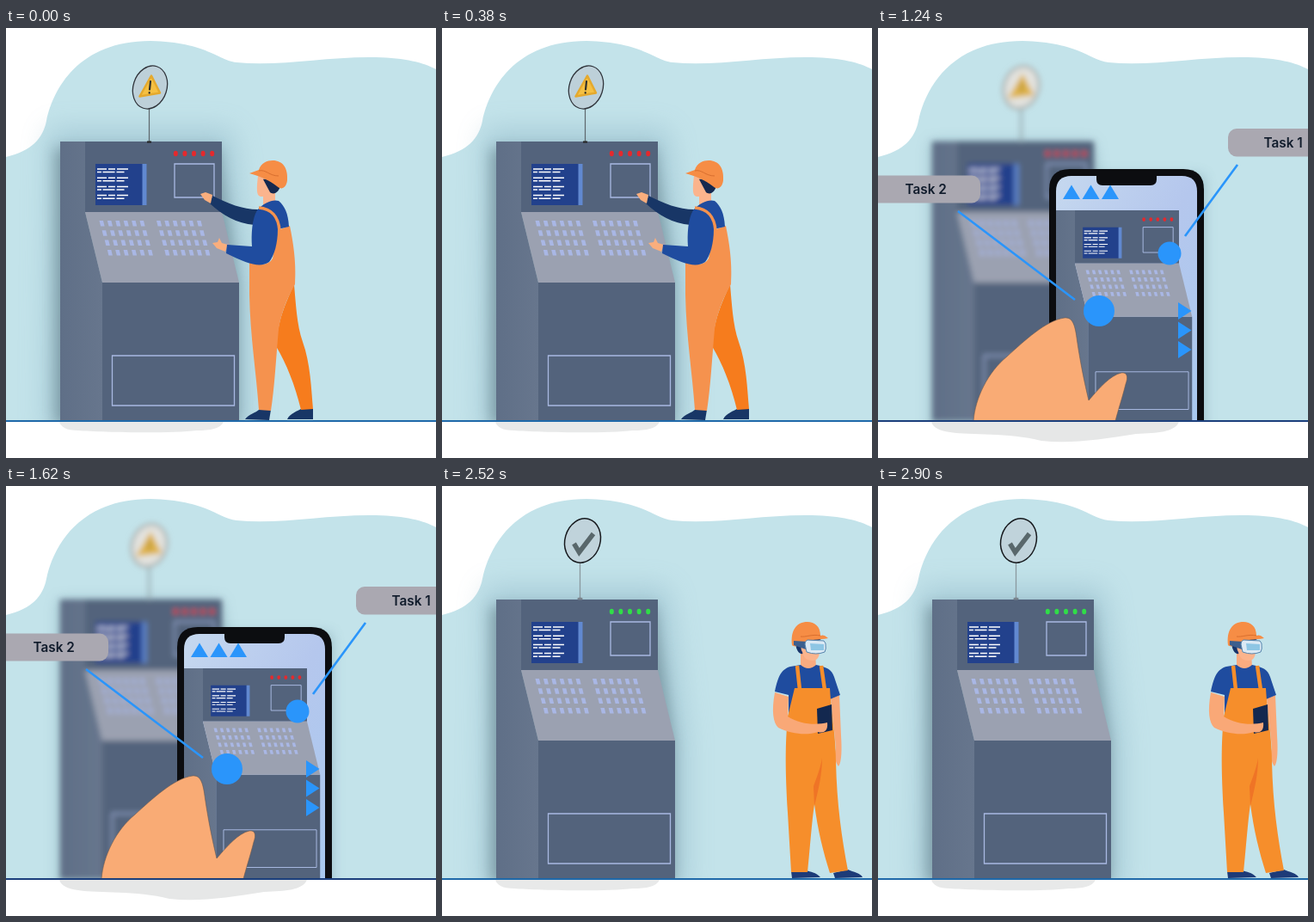
Write an HTML page that moves like this. It is 500 px wide and 500 px high and loops after 3.16 s.

```html
<!DOCTYPE html>
<html lang="en">
<head>
<meta charset="utf-8">
<title>Machine service</title>
<style>
html, body { margin: 0; width: 100%; height: 100%; overflow: hidden; background: #fff; }
svg { display: block; width: 100vw; height: 100vh; }
.scene { display: none; }
.scene.on { display: inline; }
text { font: 600 15.3px Inter, sans-serif; fill: #111c2c; }
</style>
</head>
<body>
<svg viewBox="0 0 500 500">
<defs>
  <filter id="glow" x="-30%" y="-20%" width="160%" height="140%"><feGaussianBlur stdDeviation="16"/></filter>
  <filter id="near" x="-30%" y="-20%" width="160%" height="140%"><feGaussianBlur stdDeviation="8"/></filter>
  <filter id="soft" x="-20%" y="-20%" width="140%" height="140%"><feGaussianBlur stdDeviation="3"/></filter>
  <clipPath id="air"><path d="M0 0H500V457H0Z"/></clipPath>
  <clipPath id="glass"><path d="M207 457V190Q207 172 225 172H353Q371 172 371 190V457Z"/></clipPath>
  <linearGradient id="sideFill" x2="1"><stop stop-color="#5f6f87"/><stop offset="1" stop-color="#67768d"/></linearGradient>
  <linearGradient id="glassFill" x2="1" y2="1"><stop stop-color="#c5d8ef"/><stop offset=".5" stop-color="#b5c7ed"/><stop offset="1" stop-color="#a9c9ef"/></linearGradient>
  <linearGradient id="beamFill" x1="1" x2="0"><stop stop-color="#9cf0f1" stop-opacity=".75"/><stop offset=".45" stop-color="#a9eef0" stop-opacity=".5"/><stop offset="1" stop-color="#b8eaf0" stop-opacity="0"/></linearGradient>
  <linearGradient id="fallFill" x2="0" y2="1"><stop stop-color="#95eef0" stop-opacity=".6"/><stop offset="1" stop-color="#a5e8ee" stop-opacity=".15"/></linearGradient>

  <g id="machine">
    <path fill="url(#sideFill)" d="M63 132H92V214L112 296V457H63Z"/>
    <path fill="#53637c" d="M92 132H251V214H92ZM112 296H271V457H112Z"/>
    <path fill="#9ba1b1" d="M92 214H251L271 296H112Z"/>
    <path fill="#22418c" d="M104 158H159V206H104Z"/>
    <path fill="#6189d0" d="M158.500 158H163.500V206H158.500Z"/>
    <g id="log" stroke="#fff" stroke-width="1.500"/>
    <g fill="none" stroke="#a9b9e2" stroke-width="1.300">
      <path d="M196 158H242V197H196Z"/><path d="M123.500 381H265.500V439H123.500Z"/>
    </g>
    <g id="keys" fill="#a9b7e5"/>
    <g id="lamps"/>
  </g>

  <g id="alarm">
    <path d="M166.500 94V133" stroke="#5d666c" stroke-width="1.200"/>
    <path d="M164 132.500H169" stroke="#222" stroke-width="2"/>
    <ellipse cx="167.500" cy="69" rx="19.500" ry="25.500" transform="rotate(18 167.500 69)" fill="#bdd0d9" stroke="#30343b" stroke-width="1.300"/>
    <path d="M169 55.500L179 75.500L155.500 79.500Z" fill="#f5c043" stroke="#e5a92d" stroke-width="2.500" stroke-linejoin="round"/>
    <path d="M168 62L167 71.500M166.700 75V75.600" stroke="#30302c" stroke-width="2.200" stroke-linecap="round"/>
  </g>

  <g id="done">
    <path d="M160.500 89V131" stroke="#8b999f" stroke-width="1.300"/>
    <ellipse cx="160.500" cy="131" rx="3" ry="1.500" fill="#7b858d"/>
    <ellipse cx="163.500" cy="63.500" rx="20.500" ry="26" transform="rotate(16 163.500 63.500)" fill="#c0d3db" stroke="#16191d" stroke-width="1.500"/>
    <path d="M153.500 67L159.500 77L176 55.500" fill="none" stroke="#59676b" stroke-width="5.500"/>
  </g>

  <g id="shade">
    <g clip-path="url(#air)">
      <path filter="url(#glow)" opacity=".34" fill="#6f9cb2" d="M50 118H262L284 296V470H46Z"/>
      <path filter="url(#near)" opacity=".45" fill="#4d6670" d="M56 140H248L270 300V462H56Z"/>
    </g>
    <path fill="#e8e9e9" d="M62 458H253C249 466 238 468 222 468C190 472 108 470 84 468C70 468 64 464 62 458Z"/>
  </g>

  <!-- standing worker without the free arm and the tablet -->
  <g id="body">
    <path fill="#1d3b78" d="M284 455C286 450 295 449 301 446L318 450L316 456ZM333 455C338 449 345 449 349 447L367 448L366 456Z"/>
    <path fill="#f9ab80" d="M339 194H356V211Q347 217 338 210Z"/>
    <path fill="#1f4c9f" d="M338 208C325 211 320 213 317 222L310 243L322 248V270H370V243L386 239C382 220 378 213 368 210L356 208Q347 216 338 208Z"/>
    <path fill="#f68e2b" d="M322 235H363L371 268C374 300 374 330 371 380L367 449H348C345 420 343 390 340 370C336 400 330 425 322 450L301 447C308 410 314 370 315 320C315 290 320 270 322 235Z"/>
    <path fill="#ef7426" d="M331 316C333 330 341 348 341 350L340 372C335 352 331 335 331 316Z"/>
    <path d="M328 237L332 209M357 237L360 209" stroke="#f68e2b" stroke-width="4.500"/>
    <path fill="#16346a" d="M332 178H352L362 183C361 191 358 196 353 195L350 187Z"/>
    <path fill="#fbb48d" d="M334 180C340 182 346 181 350 182L351 186C355 184 357 188 354 193C353 199 349 203 343 203C334 203 333 196 334 180Z"/>
    <path fill="#f68d45" d="M324 177C328 173 331 173 333 174C333 163 340 158 348 158C361 158 368 168 366 185C363 188 357 186 352 182C345 178 335 179 324 177Z"/>
    <path fill="none" stroke="#d96f2f" d="M333 174C343 172 350 176 356 175"/>
  </g>
  <path id="hangArm" fill="#f9a877" d="M311 243L321 247C319 270 316 290 315 305C317 313 316 321 312 326C308 321 308 305 309 290Z"/>
  <g id="visorKit">
    <use href="#body"/>
    <path fill="#13284f" d="M320 254L337 259L336 288L319 284Z"/>
    <path fill="#f9a877" d="M370 245L386 240C390 262 388 275 382 281C366 289 348 290 336 286C328 288 324 284 325 275C336 278 356 278 371 268Z"/>
    <path fill="#3c5f8e" d="M348 181L364 180V185L350 190Z"/>
    <path fill="#dbe9f4" stroke="#5684ac" d="M329 180L348 179Q351 180 351 184L349 193Q338 197 328 193Q326 190 327 183Z"/>
    <path fill="#8ec6e4" d="M329 184L345 183L344 191L329 191Z"/>
  </g>
</defs>

<path fill="#c3e3ea" d="M0 150C30 143 43 128 47 108C55 70 85 15 168 15C235 17 245 37 268 40C320 45 370 33 430 34C465 35 485 40 500 48V457H0Z"/>

<g class="scene">
  <use href="#shade"/><use href="#machine"/><use href="#alarm"/>
  <path d="M0 457H500" stroke="#1f69a9" stroke-width="2"/>
  <path fill="#183666" d="M278 455C282 449 291 447 294 444L308 444L306 456ZM327 455C330 448 340 445 343 443H357V455ZM293 211C275 211 258 204 240 195L237 204C252 218 268 227 289 229Z"/>
  <path fill="#f9ae7d" d="M240 194L232 191L226 193L231 200L238 204ZM258 252L251 250L248 244L246 249L240 250L245 256L255 260Z"/>
  <path fill="#f67c1d" d="M335 298C337 320 338 345 345 365C354 390 355 420 357 443L343 444C336 415 326 390 314 370C316 340 325 320 335 298Z"/>
  <path fill="#f5924e" d="M283 268C292 277 305 277 310 268L316 235L330 230C333 245 338 270 336 298C328 312 320 330 317 350C314 385 312 420 308 445L294 444C291 400 284 360 283 310Z"/>
  <path fill="#fbb48d" d="M293 172L302 176L307 189L313 192V204L299 208V196C291 197 291 190 293 172Z"/>
  <path fill="#1f4c9f" d="M292 212C300 203 310 199 317 201C324 207 328 215 329 231L316 234C316 250 312 265 306 272C296 279 282 275 256 262L257 252L286 254C285 240 286 222 292 212Z"/>
  <path fill="none" stroke="#f5924e" stroke-width="3.500" d="M294 209C308 210 317 219 318 236"/>
  <path fill="#16294f" d="M299 176C305 175 313 180 319 183C318 190 312 195 307 191Z"/>
  <path fill="#f68d45" d="M283 169L294 165C296 157 304 154 310 154C322 154 328 163 327 177C326 186 320 189 315 184C306 177 297 173 283 169Z"/>
  <path fill="none" stroke="#d96f2f" d="M294 166C302 164 306 172 317 172"/>
</g>

<g class="scene">
  <use href="#shade"/><use href="#machine" x="-.5"/><use href="#alarm" x="-.5"/>
  <path d="M0 457H500" stroke="#1f69a9" stroke-width="2"/>
  <use href="#hangArm"/><use href="#body"/>
  <path fill="#13284f" d="M323 266L341 264L347 290L329 293Z"/>
  <path fill="#f9a877" d="M370 245L386 240C390 262 388 272 380 277C365 286 350 290 340 289C333 288 332 281 337 278C348 281 360 276 371 268Z"/>
</g>

<g class="scene">
  <path fill="#e6e7e7" d="M62 458H350C345 470 325 471 300 472C260 478 225 484 190 480C150 470 110 474 84 470C70 468 64 464 62 458Z"/>
  <g clip-path="url(#air)">
    <path filter="url(#near)" opacity=".35" fill="#5f8292" d="M60 132H251L271 296V470H60Z"/>
    <path filter="url(#near)" opacity=".4" fill="#4d7385" d="M205 172H378V470H205Z"/>
    <use href="#machine" filter="url(#soft)"/>
    <g filter="url(#soft)">
      <ellipse cx="166.500" cy="69" rx="20" ry="25" transform="rotate(18 166 69)" fill="#e3e3df" stroke="#a5aaa9" stroke-width="3"/>
      <path d="M166.500 94V133" stroke="#87979d" stroke-width="2"/>
      <path d="M168 56L179 77L154 80Z" fill="#dfb347" stroke="#dfb347" stroke-width="3"/>
      <path d="M167 63V75" stroke="#957b40" stroke-width="2"/>
    </g>
  </g>
  <path fill="#0c0d10" d="M199 457V188Q199 164 223 164H355Q379 164 379 188V457Z"/>
  <g clip-path="url(#glass)">
    <path fill="url(#glassFill)" d="M207 172H371V457H207Z"/>
    <use href="#machine" transform="translate(159 112.500) scale(.761 .754)"/>
  </g>
  <path fill="#0c0d10" d="M254 170H324V176Q324 183 317 183H261Q254 183 254 176Z"/>
  <g id="marks" fill="#2a95fb">
    <circle cx="257" cy="329" r="18"/><circle cx="339" cy="262" r="13.500"/>
  </g>
  <path fill="#f9ab75" stroke="#6b5a50" stroke-width=".6" d="M111 457C113 430 128 400 150 382C170 364 195 340 217 337C226 336 229 345 231 360C236 395 242 420 245 433C258 418 270 404 283 401C290 400 291 406 288 414C284 430 279 445 276 457Z"/>
  <path d="M93 213L229 316M418 159L357 242" stroke="#2a95fb" stroke-width="2.600"/>
  <path d="M0 457H500" stroke="#1b3f7c" stroke-width="2"/>
  <rect x="-12" y="171.500" width="131" height="32" rx="10" fill="#aaa8b1"/>
  <rect x="407" y="117" width="120" height="32.500" rx="10" fill="#aaa8b1"/>
  <text x="31.500" y="193">Task 2</text><text x="448.500" y="139">Task 1</text>
</g>

<g class="scene">
  <use href="#shade"/><use href="#machine" x="-.5"/><use href="#alarm" x="-.5"/>
  <g fill="#f08a2c" opacity=".7"><circle cx="228.500" cy="146" r="2"/><circle cx="239" cy="146" r="2.800"/></g>
  <path d="M0 457H500" stroke="#1f69a9" stroke-width="2"/>
  <use href="#visorKit" x="130"/>
  <path fill="#f3b48d" d="M439 239L450 246C448 262 443 276 436 280C420 284 405 277 396 272L384 262L388 261L399 267C413 267 426 266 433 264Z"/>
  <path fill="url(#beamFill)" d="M195 90L462 176L456 196L355 365L240 306Z"/>
  <path fill="url(#fallFill)" d="M458 188L448 290L414 455L355 365L356 297Z"/>
  <path fill="#e4f0f2" fill-opacity=".5" d="M238 224L355 297V365L243 306Z"/>
  <path d="M241 227L333 277" stroke="#fff" stroke-width="1.800" stroke-dasharray="14 3"/>
  <path fill="#fff" opacity=".9" d="M244 298L267 310V318L244 305ZM269 311L290 323V330L269 319ZM292 324L314 336V341L292 331Z"/>
  <g transform="rotate(-25 288.500 289)" fill="none" stroke="#fff">
    <ellipse cx="288.500" cy="289" rx="22" ry="29" stroke-width="3.500"/>
    <ellipse cx="288.500" cy="289" rx="16" ry="22" stroke-width="1"/>
    <ellipse cx="288.500" cy="289" rx="9" ry="12" stroke-width="4"/>
    <ellipse cx="288.500" cy="289" rx="4" ry="5" fill="#ee5b96" stroke="none"/>
  </g>
  <path fill="none" stroke="#fff" stroke-width="1.500" d="M325 314L329 324L332 317L336 328L339 320L343 331L346 323L350 333"/>
  <path fill="none" stroke="#fff" stroke-width="1" opacity=".8" d="M323 323V341L350 354M325 332L349 344" stroke-dasharray="3 1.500"/>
  <g id="notes" opacity=".92"/>
</g>

<g class="scene">
  <use href="#shade"/><use href="#machine" style="--lamp:#30dd48"/><use href="#done"/>
  <path d="M0 457H500" stroke="#1f69a9" stroke-width="2"/>
  <g transform="translate(773) scale(-1 1)"><use href="#hangArm"/><use href="#visorKit"/></g>
</g>
</svg>

<script>
const put = (id, html) => document.getElementById(id).insertAdjacentHTML('beforeend', html);
const times = (n, make) => Array.from({ length: n }, (_, i) => make(i)).join('');

put('keys', times(4, row => times(12, i => {
  const x = 108.5 + row * 3.1 + i % 6 * 9.4 + (i > 5 ? 66.5 : 0);
  return `<path d="M${x} ${224 + row * 11.3}h4.500l1.600 6.500h-4.500z"/>`;
})));

put('lamps', times(5, i =>
  `<ellipse cx="${197.3 + i * 10.6}" cy="146" rx="2.500" ry="3.200" style="fill:var(--lamp,#e4292d)"/>`));

put('log', times(4, i => {
  const y = 164 + i * 10.2;
  return `<path d="M106 ${y}h11m2 0h8m2 0h13M106 ${y + 3.6}h5m1.500 0h14m2 0h9"/>`;
}));

put('marks', times(3, i => {
  const d = i * 22.5;
  return `<path d="M${215 + d} 199l10-16.500 10 16.500z"/><path d="M349 ${319 + d}l15.500 10-15.500 10z"/>`;
}));

const tints = ['#f268ad', '#f0e091', '#98e8b9'];
const tintOrder = [0, 1, 2, 2, 0, 1, 0, 2, 1];
put('notes', times(9, i => {
  const col = i % 3, row = Math.floor(i / 3);
  const x = 338 + col * 24.3 + row, y = 240 + col * 12.5 + row * 24.7;
  return `<path fill="${tints[tintOrder[i]]}" stroke="${tints[tintOrder[i]]}" stroke-linejoin="round" d="M${x} ${y}l21 10.500 1 14.500-21-10.500z"
    stroke-width="3" transform="translate(1 2)"/>`;
}));

const ends = [640, 1240, 1880, 2520, 3160];
const scenes = document.querySelectorAll('.scene');
const start = performance.now();

function draw() {
  const t = (performance.now() - start) % 3160;
  const now = ends.findIndex(end => t < end);
  scenes.forEach((scene, i) => scene.classList.toggle('on', i === now));
  requestAnimationFrame(draw);
}
draw();
</script>
</body>
</html>
```
